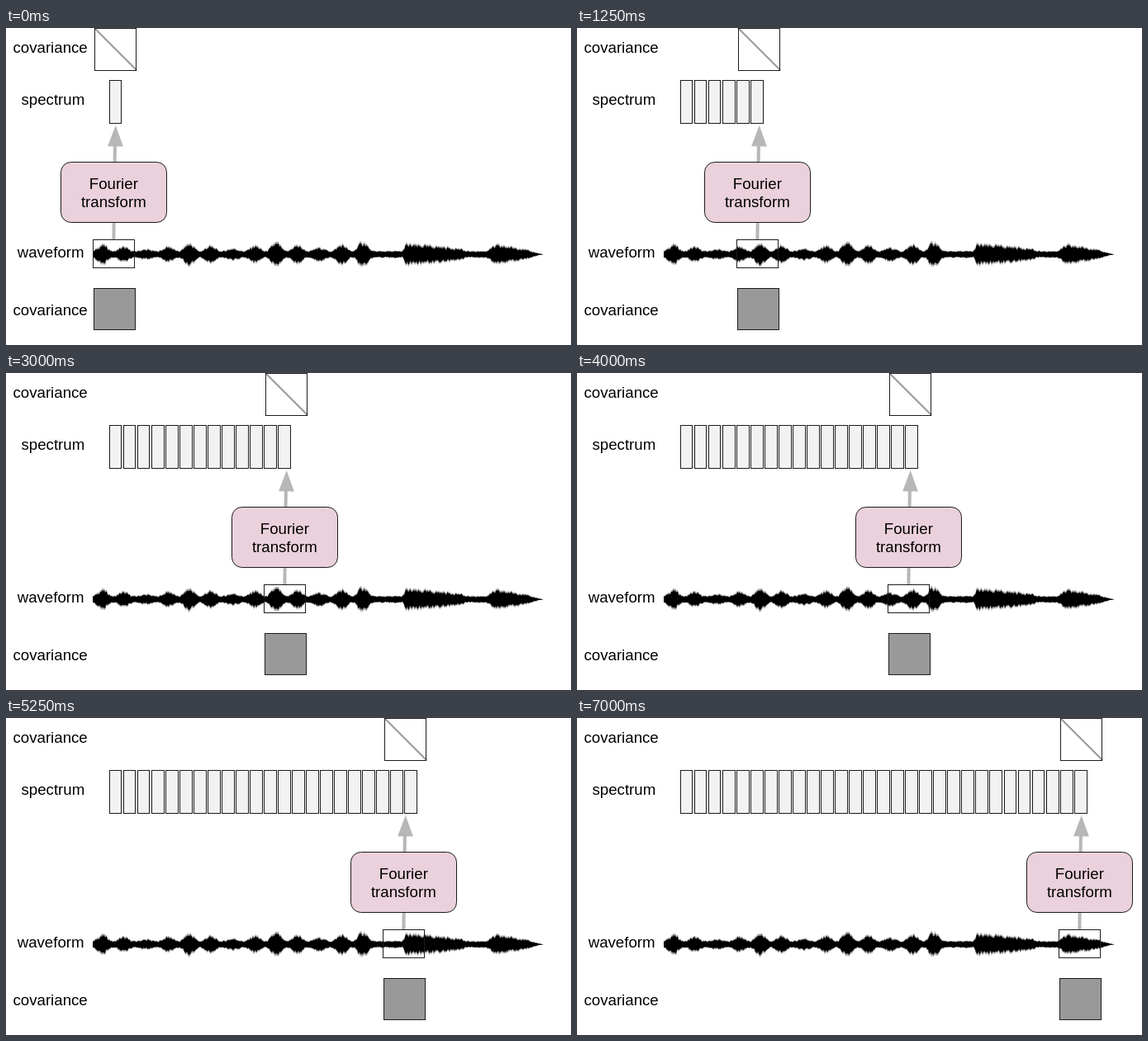
These frames come from a looping animation (684x384 px, 7250 ms). An HTML page:

```html
<!DOCTYPE html>
<html lang="en">
<head>
<meta charset="utf-8">
<title>Sliding Fourier transform</title>
<style>
  html, body { margin: 0; width: 100%; height: 100%; overflow: hidden; background: #fff; }
  svg { display: block; width: 684px; height: 384px; }
  text { font: 18.67px "Liberation Sans", Arial, sans-serif; fill: #000; }
  .box { fill: none; stroke: #1c1c1c; }
  .mid { text-anchor: middle; }
</style>
</head>
<body>
<svg viewBox="0 0 684 384">
  <text x="8.5" y="30">covariance</text>
  <text x="18.5" y="93">spectrum</text>
  <text x="13.7" y="277.5">waveform</text>
  <text x="8.5" y="347.5">covariance</text>
  <g id="bars" fill="#f2f2f2" stroke="#1c1c1c"></g>
  <path id="fuzz" opacity=".35"/>
  <path id="wave"/>
  <g id="slider">
    <path d="M107 0 L158.3 51.3" stroke="#999" stroke-width="2"/>
    <rect class="box" x="107.5" y=".5" width="50" height="51"/>
    <path d="M130.4 256 L131.9 140" stroke="#b7b7b7" stroke-width="4"/>
    <path d="M132.7 118 L141.9 143.5 L123.1 143.2 Z" fill="#b7b7b7"/>
    <rect x="66.5" y="162.5" width="128" height="73" rx="12.2" fill="#ead1dc" stroke="#1c1c1c"/>
    <text class="mid" x="130.3" y="195.3">Fourier</text>
    <text class="mid" x="130.3" y="217">transform</text>
    <rect class="box" x="105.5" y="256.5" width="50" height="34"/>
    <rect x="106.5" y="315.5" width="50" height="50" fill="#999" stroke="#1c1c1c"/>
  </g>
</svg>
<script>
const $ = id => document.getElementById(id);
const STEP = 250, STEPS = 29, PITCH = 17.044;
const WAVE_START = 105, WAVE_END = 650, WAVE_Y = 274;

// Regular syllables whose strength swells every fourth beat
function syllables(x) {
  const beat = (x - 117) / 26.25;
  if (beat > 12.5) return 0;
  const strength = 4.5 + 0.25 * beat + 3 * Math.cos(Math.PI / 2 * beat);
  return strength * Math.cos(Math.PI * beat) ** 2;
}

// A long sound: quick attack, then decay
function burst(x, from, to, height, attack, decay) {
  const u = (x - from) / (to - from);
  return u > 0 && u < 1 ? height * Math.min(1, u / attack) * (1 - u) ** decay : 0;
}

function loudness(x) {
  const hum = Math.min(3.5, (WAVE_END - x) / 8);
  return hum + syllables(x) + burst(x, 480, 556, 8, 0.05, 0.45) + burst(x, 581, 646, 8.5, 0.2, 0.9);
}

function noise(n) {
  const s = Math.sin(n * 12.9898) * 43758.5453;
  return s - Math.floor(s);
}

function wavePath(low, high) {
  const top = [], bottom = [];
  for (let x = WAVE_START; x <= WAVE_END; x++) {
    const edge = seed => loudness(x) * (low + (high - low) * noise(x + seed));
    top.push(`${x} ${(WAVE_Y - edge(0)).toFixed(1)}`);
    bottom.unshift(`${x} ${(WAVE_Y + 0.5 + edge(700)).toFixed(1)}`);
  }
  return `M${top.concat(bottom).join("L")}Z`;
}

$("fuzz").setAttribute("d", wavePath(0.85, 1.3));
$("wave").setAttribute("d", wavePath(0.65, 1.1));

// Both bar edges snap to whole pixels
for (let i = 0; i < STEPS; i++) {
  const left = 125.5 + Math.floor(PITCH * i);
  const right = 139.5 + Math.floor(PITCH * i + 0.88);
  $("bars").innerHTML += `<rect x="${left}" y="63.5" width="${right - left}" height="52"/>`;
}
const bars = [...$("bars").children];

// Two grid units per step, plus an extra unit now and then to catch up with the bars
function shift(step) {
  const extra = [4, 12, 22, 27].filter(s => step >= s).length;
  return Math.floor(7.97 * (2 * step + extra) + 0.65);
}

function draw(now) {
  const step = Math.floor(now / STEP) % STEPS;
  $("slider").setAttribute("transform", `translate(${shift(step)} 0)`);
  bars.forEach((bar, i) => bar.style.display = i <= step ? "" : "none");
}

let start;
function frame(now) {
  start ??= now;
  draw(now - start);
  requestAnimationFrame(frame);
}
draw(0);
requestAnimationFrame(frame);
</script>
</body>
</html>
```
